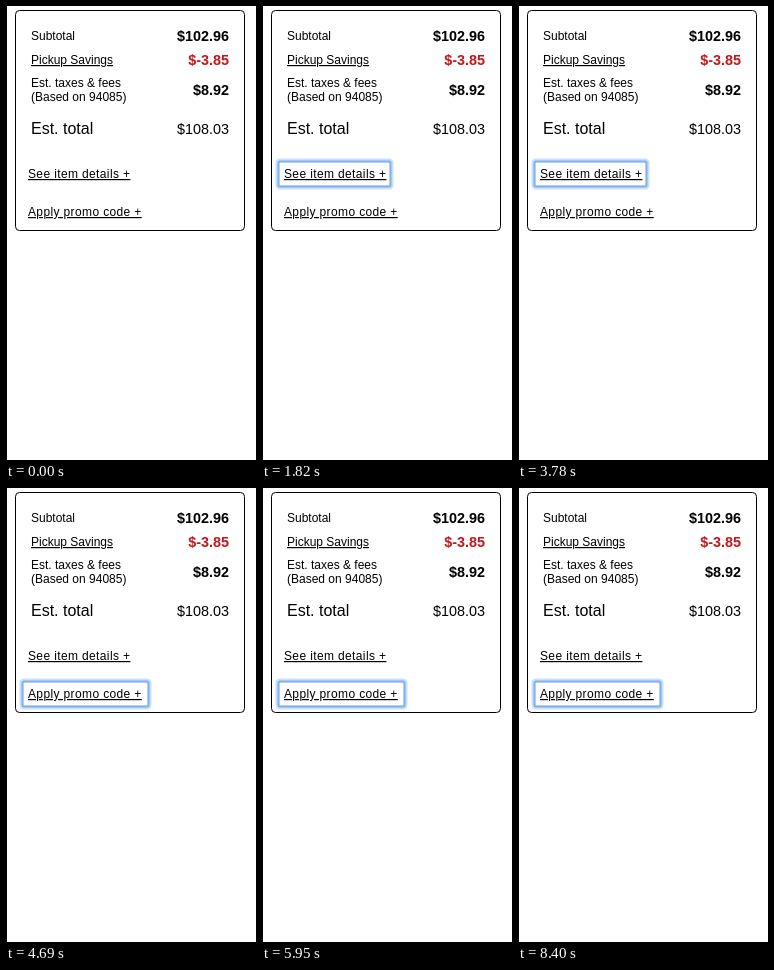
Animation of 250 by 454 pixels, one loop 9520 ms. Source, as an HTML page:

```html
<!DOCTYPE html>
<html lang="en">
<head>
<meta charset="utf-8">
<title>Order summary</title>
<style>
  html, body { margin: 0; width: 100%; height: 100%; overflow: hidden; background: #fff; }
  svg { display: block; width: 250px; height: 454px; font: 12px "Liberation Sans", Arial, sans-serif; }
  .price { font-size: 14.4px; text-anchor: end; }
  .bold { font-weight: bold; }
  .link { text-decoration: underline; }
  .toggle { letter-spacing: .37px; }
  .line { fill: #fff; stroke: #000; }
  .ring rect { fill: none; stroke: #7fb0f2; }
  .tip { font-size: 11.2px; }
  .tip rect { fill: #fff; stroke: #d4d4d4; filter: drop-shadow(1px 1px 2px rgba(0, 0, 0, .3)); }
</style>
</head>
<body>
<svg viewBox="0 0 250 454">
  <path d="M.5 0V454" stroke="#000"/>
  <rect id="card" class="line" x="9.5" y="4.5" width="229" height="220" rx="4"/>

  <text x="25" y="34">Subtotal</text>
  <text x="25" y="58" class="link">Pickup Savings</text>
  <text x="25" y="81">Est. taxes &amp; fees</text>
  <text x="25" y="95">(Based on 94085)</text>
  <text x="25" y="128" font-size="16">Est. total</text>
  <text x="223" y="35" class="price bold">$102.96</text>
  <text x="223" y="59" class="price bold" fill="#c2171d">$-3.85</text>
  <text x="223" y="89" class="price bold">$8.92</text>
  <text x="223" y="128" class="price">$108.03</text>

  <g id="ring" class="ring">
    <rect class="edge" x="15.5" y="154.5" height="27" rx="2.5" stroke-width="4" opacity=".4"/>
    <rect class="edge" x="16.5" y="155.5" height="25" rx="1.5" stroke-width="2"/>
  </g>
  <text id="itemToggle" x="22" y="172" class="link toggle"></text>
  <text id="promoToggle" x="22" y="210" class="link toggle"></text>

  <g id="item">
    <g stroke-linecap="round" stroke-linejoin="round">
      <path d="M58 241V249M58 248L46 252M58 248L72 251M58 248L52 255M58 248L65 255" fill="none" stroke="#252427" stroke-width="2.2"/>
      <path d="M48 207Q54 203 59 207L65 221L66 236L52 239L47 222Z" fill="#29262a"/>
      <path d="M50 209L56 208L61 221L63 233L54 235L50 221Z" fill="#b51d32"/>
      <path d="M50 213L57 211L58 215L51 217Z" fill="#29262a"/>
      <path d="M50 236L64 231L73 235L71 240L56 244L50 241Z" fill="#a71d31"/>
      <path d="M51 241L57 243L71 240" fill="none" stroke="#29262a" stroke-width="2"/>
      <path d="M65 222L73 221M69 222L70 232M46 226L52 228L52 237" fill="none" stroke="#29262a" stroke-width="2.4"/>
    </g>
    <text x="103" y="209">Furnishing by QZV</text>
    <text x="103" y="223">FNS-4172 Sporty</text>
    <text x="103" y="237">Shape Padded Studio</text>
    <text x="103" y="251">Chair, Red</text>
    <text x="106" y="268">$99.11 Qty: 1</text>
  </g>

  <g id="promo">
    <text x="26" y="235" fill="#777">Promo Code</text>
    <path d="M27 268H155.5V239" fill="none" stroke="#e4e4e4" stroke-width="2"/>
    <path d="M27 269V239H156" fill="none" stroke="#858585" stroke-width="2"/>
    <rect class="line" x="157.5" y="238.5" width="56" height="30" rx="12"/>
    <text x="185.5" y="258" class="bold" font-size="12.8" text-anchor="middle">Apply</text>
  </g>

  <g id="tip" class="tip">
    <rect x="1.5" y="65.5" width="169" height="85"/>
    <text x="10" y="96">Picking up your order in the</text>
    <text x="10" y="111">store helps cut costs, and</text>
    <text x="10" y="126">we pass the savings to you.</text>
  </g>
</svg>
<script>
  const LOOP = 9520;
  const CLOSED = 220, ITEM_SPACE = 100, PROMO_SPACE = 61;
  const $ = id => document.getElementById(id);
  const show = (id, on) => $(id).setAttribute('visibility', on ? 'visible' : 'hidden');
  const edges = document.querySelectorAll('.edge');

  function draw(now) {
    const t = now % LOOP;
    const during = (from, to) => t >= from && t < to;
    const itemOpen = during(2590, 3640);
    const promoOpen = during(4830, 5950);
    const onPromo = t >= 4690;

    show('item', itemOpen);
    show('promo', promoOpen);
    show('tip', during(6230, 8400));
    show('ring', t >= 1820);

    $('itemToggle').textContent = itemOpen ? 'Hide item details -' : 'See item details +';
    $('promoToggle').textContent = promoOpen ? 'Hide promo code -' : 'Apply promo code +';
    $('promoToggle').setAttribute('y', itemOpen ? 310 : 210);
    $('card').setAttribute('height', CLOSED + itemOpen * ITEM_SPACE + promoOpen * PROMO_SPACE);

    const ringWidth = onPromo ? (promoOpen ? 119 : 128) : (itemOpen ? 117 : 114);
    edges.forEach((edge, i) => edge.setAttribute('width', ringWidth - 2 * i));
    $('ring').setAttribute('transform', `translate(0 ${onPromo ? 38 : 0})`);

    requestAnimationFrame(draw);
  }
  draw(0);
</script>
</body>
</html>
```
